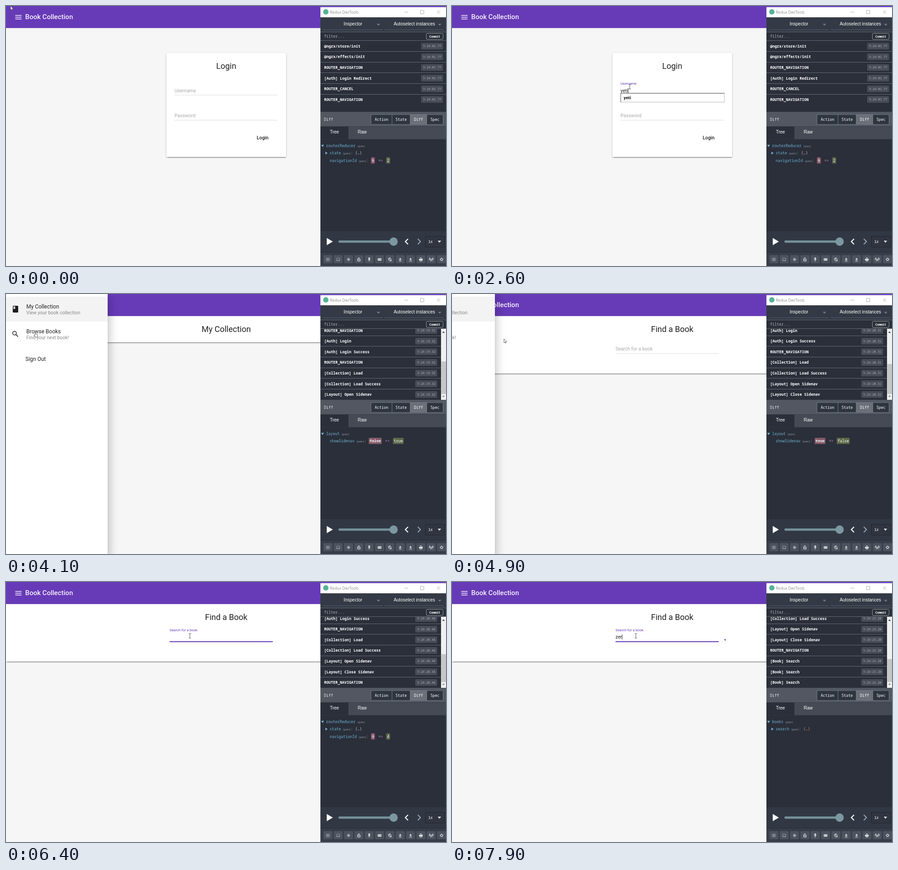
Write an HTML page that moves like this. It is 974 px wide and 575 px high and loops after 8 s.

```html
<!DOCTYPE html>
<html lang="en">
<head>
<meta charset="utf-8">
<title>Book Collection</title>
<style>
html, body { margin: 0; width: 100%; height: 100%; overflow: hidden; }
#stage { position: relative; width: 974px; height: 575px; overflow: hidden; background: #f6f6f6; }
#stage > * { position: absolute; left: 0; top: 0; }
svg { display: block; overflow: hidden; }
.card {
  background: #fff;
  box-shadow: 0 2.2px .8px -1.5px rgba(0,0,0,.3), 0 1.5px 1.5px rgba(0,0,0,.22), 0 .8px 3.8px rgba(0,0,0,.16);
}
#drawer {
  width: 225px; height: 575px; background: #fff;
  box-shadow: 0 6px 7.5px -3.8px rgba(0,0,0,.2), 0 12px 18px 1.5px rgba(0,0,0,.14), 0 4.5px 22px 3.8px rgba(0,0,0,.12);
}
text { font-family: Roboto, sans-serif; fill: #212121; }
.brand { font-size: 15px; font-weight: 500; fill: #f6f2fb; }
.title { font-size: 18px; text-anchor: middle; }
.label { font-size: 10.5px; fill: #a9a9a9; }
.typed { font-size: 10.5px; }
.button { font-size: 10.5px; font-weight: 500; }
.item { font-size: 12px; }
.hint { font-size: 10.5px; fill: #878787; }
.option { font: 700 8.6px "Open Sans", sans-serif; fill: #000; }
.win { font: 8.6px "Open Sans", sans-serif; fill: #8b8b8b; }
.ui { font: 10px "Liberation Sans", Arial, sans-serif; fill: #fff; text-anchor: middle; }
.mono { font: 8.35px "Noto Sans Mono", monospace; fill: #e8e8ea; }
.row { font-weight: 600; fill: #fff; }
.time, .commit { font-size: 6.7px; text-anchor: middle; fill: #b0b0b8; }
.commit { font-weight: 600; fill: #fff; }
.mid { text-anchor: middle; fill: #fff; }
.key { fill: #6fb3d2; }
.pin { font-size: 5.85px; fill: #b0b0b8; }
.arrow { fill: #d381c3; }
.old { text-decoration: line-through; }
.icon { fill: none; stroke: #fff; stroke-width: 1; }
.faint { stroke: #a3a8b0; stroke-width: .8; }
</style>
</head>
<body>
<div id="stage">
  <div id="card" class="card"></div>
  <svg id="page" width="974" height="575"></svg>
  <div id="drawer"></div>
  <svg id="tools" width="974" height="575"></svg>
  <svg id="pointer" width="974" height="575"></svg>
</div>
<script>
const LOOP = 8000, STEP = 100, PURPLE = '#673ab7', DARK = '#2a2f3a';
const $ = id => document.getElementById(id);

// Drawing helpers
const text = (x, y, s, c = '', a = '') => `<text x="${x}" y="${y}" class="${c}" ${a}>${s}</text>`;
const rect = (x, y, w, h, fill, a = '') => `<rect x="${x}" y="${y}" width="${w}" height="${h}" fill="${fill}" ${a}/>`;
const path = (d, a = '') => `<path d="${d}" ${a}/>`;
const group = (id, s) => `<g id="${id}">${s}</g>`;

// Time helpers
const clamp = v => Math.max(0, Math.min(1, v));
const mix = (a, b, k) => a + (b - a) * k;
const easeOut = p => 1 - (1 - p) ** 3;
const easeBoth = p => p * p * (3 - 2 * p);
const ramp = (t, a, b) => easeOut(clamp((t - a) / (b - a)));
const during = (t, a, b) => t >= a && t < b;
const show = (id, on) => { $(id).style.display = on ? '' : 'none'; };
const typedAt = (word, times, t) => word.slice(0, times.filter(at => t >= at).length);

// Text fields with a floating label
const WIDE = 228.5;
const field = (id, x, y, label) => group(id,
  rect(x, y + 6, WIDE, 1, '#dedede') + text(x, y, label, 'label') +
  rect(x, y + 6, 0, 2, PURPLE, 'class="ink"') + text(x, y, '', 'typed') +
  rect(x, y - 9, .9, 11, '#222', 'class="caret"'));

function setField(id, x, y, t, start, word, caret) {
  const part = c => $(id).querySelector(c);
  const k = ramp(t, start - STEP, start + 300), label = part('.label'), ink = part('.ink');
  label.setAttribute('y', y - 16.5 * k);
  label.style.fontSize = mix(10.5, 7.9, k) + 'px';
  label.style.fill = k ? PURPLE : '';
  ink.setAttribute('x', x + WIDE * (1 - k) / 2);
  ink.setAttribute('width', WIDE * k);
  const typed = part('.typed');
  typed.textContent = word;
  part('.caret').setAttribute('x', x + (word ? typed.getComputedTextLength() : 0));
  part('.caret').style.display = caret ? '' : 'none';
}

const NAME = 'yeti', NAME_AT = [1900, 2100, 2400, 2600];
const QUERY = 'zer', QUERY_AT = [7000, 7200, 7500];
const CARDS = { login: [355, 104, 265, 230], shelf: [0, 49, 974, 58], find: [0, 49, 974, 127] };

$('page').innerHTML =
  rect(0, 0, 974, 48.75, PURPLE) +
  path('M20.5 20.7h14M20.5 24.7h14M20.5 28.8h14', 'stroke="#f6f2fb" stroke-width="1.5"') +
  text(42.5, 29, 'Book Collection', 'brand') +
  group('login',
    text(487.5, 139, 'Login', 'title') +
    field('user', 373, 190.5, 'Username') +
    text(373, 246, 'Password', 'label') + rect(373, 252, WIDE, 1, '#dedede') +
    text(555, 294.5, 'Login', 'button') +
    group('popup', rect(373.5, 193, 229.5, 19.5, '#fff', 'stroke="#b5b5b5"') +
      path('M373.5 213V193H603', 'fill="none" stroke="#555"') + text(380, 206, NAME, 'option'))) +
  group('shelf', text(487.5, 84, 'My Collection', 'title')) +
  group('find', text(487.5, 84, 'Find a Book', 'title') +
    field('search', 362, 125, 'Search for a book') +
    path('', `id="spinner" fill="none" stroke="${PURPLE}" stroke-width="2.3"`));

$('drawer').innerHTML = '<svg width="225" height="575">' + rect(0, 6, 225, 55, '#f3f3f3') +
  path('M18 2H6a2 2 0 0 0-2 2v16a2 2 0 0 0 2 2h12a2 2 0 0 0 2-2V4a2 2 0 0 0-2-2zM6 4h5v8l-2.5-1.5L6 12z',
    'fill="#1d1d1d" fill-rule="evenodd" transform="translate(12 24.5) scale(.75)"') +
  '<circle cx="18.8" cy="86.6" r="4.1" fill="none" stroke="#1d1d1d" stroke-width="1.5"/>' +
  path('M21.7 89.5L26.6 94.4', 'stroke="#1d1d1d" stroke-width="1.7"') +
  text(45, 31.5, 'My Collection', 'item') + text(45, 45, 'View your book collection', 'hint') +
  text(45, 86.5, 'Browse Books', 'item') + text(45, 99.5, 'Find your next book!', 'hint') +
  text(43, 148, 'Sign Out', 'item') + '</svg>';

// Developer tools window
const LEFT = 696, SPAN = 974 - LEFT;
const band = (y, h, fill) => rect(LEFT, y, SPAN, h, fill);
const tri = (x, y, w, h, fill) => path(`M${x} ${y}h${w}l${-w / 2} ${h}z`, `fill="${fill}"`);
const ICONS = [
  'M-3.5-3h7v6h-7zM-1-3V3M1-3V3M-3.5 0h7',
  'M-3.5-3h7v6h-7zM-3.5 1.5h7',
  'M0-2.5a2.5 2.5 0 1 0 .1 0zM-1 0h2M0-1v2',
  'M-2.8-.5h5.6v4h-5.6zM-1.7-.5v-1.5a1.7 1.7 0 0 1 3.4 0M0 1v1',
  'M-2-3.5h4M-1-3.5v3.5M1-3.5v3.5M0-3v3M-2.5.5h5M0 .5v4',
  'M-3.5-2h7v4h-7zM-2.5-.5h5M-2 1h4',
  'M0-2.5a3 3 0 1 0 .1 0zM-1-4h2M-4-3.5L4 4',
  'M0-3L-2 0H2zM0-1V2M-3 3.5h6',
  'M0 1.5L-2-1H2zM0-3.5V0M-3 3.5h6',
  'M-2-3.5h4M-3.5-1h7v2.5h-7zM-2 1v2.5h4V1M-3 0h6',
  'M0-1L-2 4M0-1L2 4M-2-3q-1.5 2 0 3.5M2-3q1.5 2 0 3.5M-3.5-4q-2 3 0 5.5M3.5-4q2 3 0 5.5',
  'M0-2.2a2.2 2.2 0 1 0 .1 0zM0-3.8V-2M0 2V3.8M-3.8 0H-2M2 0H3.8M-2.7-2.7L-1.5-1.5M1.5 1.5L2.7 2.7M2.7-2.7L1.5-1.5M-1.5 1.5L-2.7 2.7'
];
const toolbar = ICONS.map((d, i) => {
  const x = 712.5 + i * 22.88;
  return rect(x - 10, 551, 20, 18, '#4d535e', 'rx="2"') +
    path(d, `class="icon ${i < 2 ? 'faint' : ''}" transform="translate(${x} 560.5)"`);
}).join('');
const modes = [['Action', 808, 46.5], ['State', 854.5, 40.5], ['Diff', 895, 36.5], ['Spec', 931.5, 36]]
  .map(([s, x, w]) => rect(x, 240, w, 22, s === 'Diff' ? '#6b6f78' : '#2f3540', 'stroke="#7b7f87" stroke-width=".9"') +
    text(x + w / 2, 254, s, 'mono mid')).join('');

$('tools').innerHTML =
  `<clipPath id="view">${band(77, 157, '#000')}</clipPath>` +
  band(2.5, 23, '#fff') + band(25, 550, DARK) +
  '<circle cx="708" cy="13" r="6" fill="#58b396"/>' + text(717, 17, 'Redux DevTools', 'win') +
  path('M882 13.5h8M917.5 9.8h7.5v7.5h-7.5zM954 10l7 7M961 10l-7 7', 'fill="none" stroke="#a3a3a3" stroke-width=".9"') +
  band(25, 32, '#343a45') +
  path('M702 52.5H834M838 52.5H970', 'stroke="#59606b"') +
  text(768, 43, 'Inspector', 'ui') + text(904, 43, 'Autoselect instances', 'ui') +
  tri(820.5, 39.5, 8, 4, '#737a85') + tri(956, 39.5, 8, 4, '#737a85') +
  band(57, 1, '#656a74') + band(76, 1, '#656a74') +
  text(704, 70, 'filter...', 'mono', 'style="fill:#b0b0b8"') +
  rect(930.5, 60.5, 37, 13.5, DARK, 'rx="2" stroke="#a6a9ae" stroke-width=".9"') +
  text(949, 69.7, 'Commit', 'mono commit') +
  '<g id="log" clip-path="url(#view)"></g>' +
  band(234, 32, '#525761') + text(704, 254, 'Diff', 'mono') + modes +
  band(266.5, 28, '#454a54') + rect(LEFT, 266.5, 62, 28, DARK) +
  text(727, 282, 'Tree', 'ui') + text(788.5, 282, 'Raw', 'ui') + group('tree', '') +
  band(498, 47, '#323843') +
  path('M710 513V529L723.5 521z', 'fill="#fff"') +
  rect(736, 518.5, 122, 5, '#75919b', 'rx="2"') + '<circle cx="858" cy="521" r="9.2" fill="#7b97a2"/>' +
  path('M890 515l-6 6l6 6', 'fill="none" stroke="#fff" stroke-width="2.2"') +
  path('M911.5 515l6 6l-6 6', 'fill="none" stroke="#989ca2" stroke-width="2.2"') +
  rect(928.5, 509.5, 42.5, 23.5, '#303540', 'stroke="#20242d"') +
  text(939.5, 524.2, '1x', 'ui', 'style="font-size:9px"') + tri(956, 519, 7, 4.5, '#fff') +
  band(545, 30, '#383e49') + band(544, 1, '#262b34') + toolbar;

const NAV = 'ROUTER_NAVIGATION', FIND = '[Book] Search';
const LOG = ['@ngrx/store/init', '@ngrx/effects/init', NAV, '[Auth] Login Redirect', 'ROUTER_CANCEL', NAV,
  '[Auth] Login', '[Auth] Login Success', NAV, '[Collection] Load', '[Collection] Load Success',
  '[Layout] Open Sidenav', '[Layout] Close Sidenav', NAV, FIND, FIND, FIND];

// start, rows, seconds, root, key, old value, new value
const STATES = [
  [0, 6, '01.77', 'routerReducer', 'navigationId', '1', '2'],
  [2800, 9, '18.20', 'routerReducer', 'navigationId', '2', '3'],
  [2900, 11, '18.33', 'books', 'collection'],
  [3900, 12, '19.32', 'layout', 'showSidenav', 'false', 'true'],
  [4900, 13, '20.31', 'layout', 'showSidenav', 'true', 'false'],
  [5000, 14, '20.48', 'routerReducer', 'navigationId', '3', '4'],
  [7100, 15, '22.63', 'books', 'search'],
  [7300, 16, '22.89', 'books', 'search'],
  [7600, 17, '23.20', 'books', 'search']
];
const TOP = 77, VIEW = 157, PITCH = 23.6, CHAR = 5.01;

function drawLog(rows, time) {
  const bar = rows * PITCH > VIEW, right = bar ? 963 : 974;
  const top = bar ? TOP + VIEW - rows * PITCH : TOP;
  let out = '';
  LOG.slice(0, rows).forEach((name, i) => {
    const y = top + (i + .5) * PITCH, x = right - (bar ? 57 : 55);
    out += text(704.3, y + 3, name, 'mono row') +
      rect(x, y - 7.3, 48.5, 14.6, '#474c57', 'rx="2"') + text(x + 24.3, y + 2.3, '5:24:' + time, 'mono time');
    if (i < rows - 1) out += rect(LEFT, Math.round(y + PITCH / 2 - .5), right - LEFT, 1, '#656a74');
  });
  if (bar) {
    const h = 130 * VIEW / (rows * PITCH);
    out += rect(963, TOP, 11, VIEW, '#f0f0f0') + rect(963.5, 221.3 - h, 10.5, h, '#c6c6c6') +
      tri(965.5, 86, 6, -3.5, '#4b4b4b') + tri(965.5, 225, 6, 3.5, '#8e8e8e');
  }
  $('log').innerHTML = out;
}

const keyName = (x, y, s) => text(x, y, s, 'mono key') + text(x + s.length * CHAR + 3.9, y, '(pin)', 'mono pin');
const chip = (x, y, s, fill, c) => rect(x, y - 10, s.length * 5 + 3.6, 13.8, fill, 'rx="1.5"') +
  text(x + 1.8, y, s, 'mono ' + c, 'style="fill:#fff"');
const opener = y => path(`M707 ${y - 5.8}v6l5-3z`, 'fill="#6fb3d2"');

function drawTree(root, key, from, to) {
  const x = 716.5, router = root === 'routerReducer';
  const value = s => x + s.length * CHAR + 31.3;
  const braces = (y, s, fill) => opener(y) + keyName(x, y, s) + text(value(s) - 10, y, ':', 'mono key') +
    text(value(s), y, '{…}', 'mono', `style="fill:${fill}"`);
  let out = tri(697.5, 307, 6.5, 5, '#6fb3d2') + keyName(708.5, 311.6, root);
  if (router) out += braces(328, 'state', '#b8b8bd');
  if (from) {
    const y = router ? 344.6 : 328, v = value(key), next = v + from.length * 5 + 11;
    out += keyName(x, y, key) + text(v - 10, y, ':', 'mono key') + chip(v, y, from, '#865b68', 'old') +
      text(next + .7, y, '=&gt;', 'mono arrow') + chip(next + 17.7, y, to, '#5c6848', '');
  } else out += braces(328, key, '#e07f56');
  $('tree').innerHTML = out;
}

// Pointer: time, x, y, shape from then on
const ROUTE = [
  [0, 10, 0, 'arrow'], [600, 393.5, 178.5, 'beam'], [2800, 393.5, 178.5, 'arrow'], [3200, 393.5, 178.5, 'arrow'],
  [3500, 30, 28.5, 'hand'], [3700, 30, 28.5, 'hand'], [3800, 34.3, 27.5, 'arrow'], [3900, 41, 50, 'hand'],
  [4100, 65, 84.5, 'hand'], [4500, 97, 93, 'hand'], [4600, 97, 93, 'hand'], [4700, 97, 94, 'hand'],
  [4800, 97, 94, 'hand'], [4900, 115, 99, 'arrow'], [5400, 393.5, 147, 'arrow'], [5600, 407, 119, 'beam'],
  [LOOP, 407, 119, 'beam']
];
const shape = (id, d, a) => path(d, `id="${id}" ${a}`);
const OUTLINE = 'fill="#fff" stroke="#3a3a3a" stroke-width=".8"';
$('pointer').innerHTML =
  shape('arrow', 'M0 0V8.6L2 6.8L3.3 9.8L4.8 9.2L3.5 6.2H6.2z', OUTLINE) +
  shape('hand', 'M-1 .8a1 1 0 0 1 2 0V4l3.2.8q1 .3.9 1.4L4.5 10.8H-.2L-3 7.4q-.3-1 .8-1L-1 7.2z', OUTLINE) +
  shape('beam', 'M-2.5-5H-.5L0-4.6L.5-5H2.5M0-4.6V4.6M-2.5 5H-.5L0 4.6L.5 5H2.5', 'fill="none" stroke="#444" stroke-width=".9"');

function movePointer(t) {
  const i = ROUTE.findIndex((p, n) => t >= p[0] && t < ROUTE[n + 1][0]);
  const [a, x, y, kind] = ROUTE[i], [b, x2, y2] = ROUTE[i + 1];
  const k = easeBoth((t - a) / (b - a));
  for (const id of ['arrow', 'hand', 'beam']) show(id, id === kind);
  $(kind).setAttribute('transform', `translate(${mix(x, x2, k)} ${mix(y, y2, k)})`);
}

// Arc grows from its tail, then shrinks towards its head
function spin(t) {
  const u = (t - 6950) / 1000, r = 10.3, cx = 609.7, cy = 119;
  const sweep = u < .5 ? mix(18, 288, easeBoth(clamp(u * 2))) : mix(288, 18, easeOut(clamp(u * 2 - 1)));
  const head = 129 + (t - 7900) * .18 - (u < .5 ? 288 - sweep : 0);
  const at = deg => {
    const q = deg * Math.PI / 180;
    return (cx + r * Math.cos(q)).toFixed(2) + ' ' + (cy + r * Math.sin(q)).toFixed(2);
  };
  $('spinner').setAttribute('d', `M${at(head - sweep)}A${r} ${r} 0 ${sweep > 180 ? 1 : 0} 1 ${at(head)}`);
  $('spinner').style.opacity = clamp((t - 6950) / 300);
}

let shown = null;
function render(t) {
  const scene = t < 2800 ? 'login' : t < 4900 ? 'shelf' : 'find';
  for (const id in CARDS) show(id, id === scene);
  ['left', 'top', 'width', 'height'].forEach((p, i) => { $('card').style[p] = CARDS[scene][i] + 'px'; });

  if (scene === 'login') {
    setField('user', 373, 190.5, t, 800, typedAt(NAME, NAME_AT, t), during(t, 900, 1400) || t >= 1900);
    show('popup', t >= 1900);
  }
  if (scene === 'find') {
    setField('search', 362, 125, t, 5800, typedAt(QUERY, QUERY_AT, t), during(t, 5900, 6400) || t >= 7000);
    show('spinner', t >= 7000);
    spin(t);
  }

  show('drawer', during(t, 3800, 5300));
  const open = ramp(t, 3800, 4100) - ramp(t, 4800, 5200);
  $('drawer').style.transform = `translateX(${-225 * (1 - open)}px)`;

  const state = STATES.filter(s => t >= s[0]).pop();
  if (state !== shown) {
    const [, rows, time, ...diff] = shown = state;
    drawLog(rows, time);
    drawTree(...diff);
  }
  movePointer(t);
}

const begin = performance.now();
function tick(now) {
  const t = Math.max(0, now - begin) % LOOP;
  render(Math.floor(t / STEP) * STEP);
  requestAnimationFrame(tick);
}
render(0);
requestAnimationFrame(tick);
</script>
</body>
</html>
```
